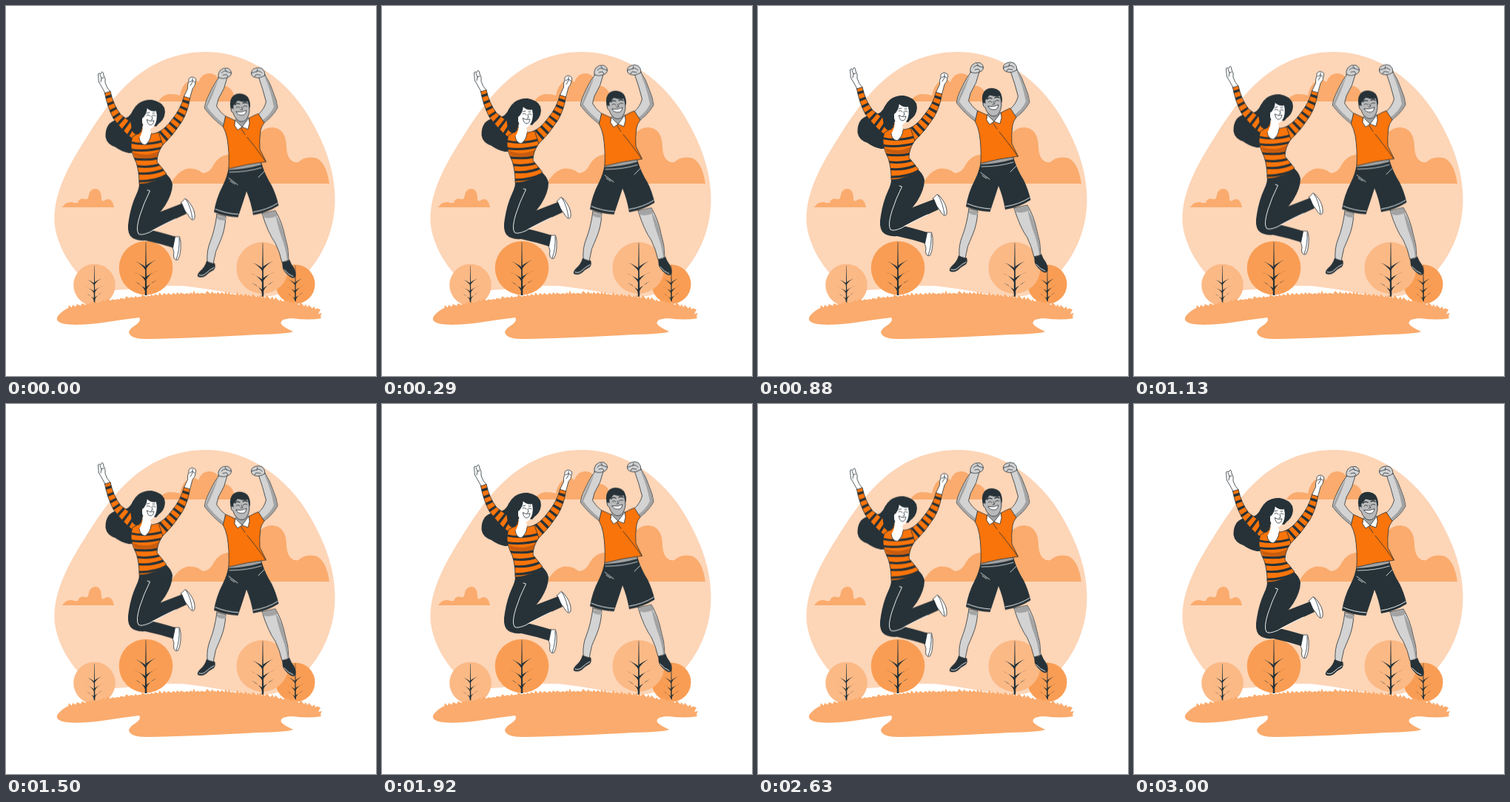
Animation, 500 px wide and 500 px high, one loop 3.04 s. Source, as an HTML page:

```html
<!DOCTYPE html>
<html lang="en">
<head>
<meta charset="utf-8">
<title>Jumping friends</title>
<style>
html, body { margin: 0; width: 100%; height: 100%; overflow: hidden; background: #fff; }
svg { display: block; width: 100vw; height: 100vh; }
.float { animation: float 3040ms linear -40ms infinite; }
.fast { animation-duration: 1520ms; }
@keyframes float { 50% { transform: translateY(-10px); } }
.dark { fill: #263238; }
.orange { fill: #f9740b; }
.pale { fill: #faab6d; }
.line { fill: none; stroke: #263238; stroke-width: .8; stroke-linecap: round; stroke-linejoin: round; }
.ink { stroke: #263238; stroke-width: .8; stroke-linejoin: round; stroke-linecap: round; }
.white { fill: #fff; }
.skin { fill: #d3d3d3; }
.shade { fill: #a3a3a3; }
.seam { fill: none; stroke: #fff; stroke-width: .9; stroke-linecap: round; }
.stripe { fill: none; stroke: #263238; stroke-width: 3.1; }
.bands { fill: none; stroke: #263238; stroke-width: 30; stroke-dasharray: 3.4 5.9; }
</style>
</head>
<body>
<svg viewBox="0 0 500 500">
<defs>
  <path id="twigs" d="M0-4Q-4-14-15-19Q-6-13 0-9ZM0-18Q-5-28-17-32Q-6-27 0-23ZM0-33Q-4-41-14-46Q-5-42 0-38Z"/>
  <g id="tree" class="dark">
    <path d="M-1.300 0L-.3-72H.3L1.300 0Z"/>
    <use href="#twigs"/>
    <use href="#twigs" transform="translate(0 -2) scale(-1 1)"/>
  </g>
  <path id="sleeveL" d="M133.500 118L141 115.500Q145 134 155 147Q169 159 185 165L183 181L170 179Q157 169 145 152Q137 137 133.500 118Z"/>
  <path id="sleeveR" d="M240.500 122.500L248.500 125Q246 142 238 156Q226 175 212 188L202 187L203 172Q215 167 224 154Q236 140 240.500 122.500Z"/>
  <path id="top" d="M171 177Q179 172 184 169L198 173L206 171L212 188Q204 199 204 211Q211 219 217 227Q202 240 180 241Q180 224 176 212Q168 196 169 185Z"/>
  <clipPath id="clipL"><use href="#sleeveL"/></clipPath>
  <clipPath id="clipR"><use href="#sleeveR"/></clipPath>
  <clipPath id="clipTop"><use href="#top"/></clipPath>
</defs>

<path fill="#fdd5b7" d="M271 62C330 62 381 102 409 149C435 193 445 229 444.500 264C444 307 424 347 396 371C382 384 367 393 346 393C308 391 280 382 236 378C203 377 160 385 135 384C108 382 75 342 67 303C59 262 83 218 108 179C137 134 180 62 271 62Z"/>
<g class="pale">
  <path d="M206 129Q211 120 221 119Q230 119 235 121Q238 105 248 101Q256 98 260 103Q264 91 275 91Q288 92 290 108Q297 107 302 111Q308 115 308 124L314 129Z"/>
  <path d="M223 240Q231 224 244 220Q256 218 266 226Q275 226 281 214Q287 203 299 201Q317 199 329 214Q334 164 360 164Q378 165 379 190C379 204 386 213 395 211Q404 203 417 205Q432 208 437 240Z"/>
  <path d="M76 272Q81 264 89 265Q94 267 97 266Q99 259 108 261Q111 262 112 255Q114 247 121 247Q129 247 129 262Q131 265 134 262Q143 258 146 272Z"/>
</g>

<circle cx="119.500" cy="377" r="28.300" fill="#fbb986"/>
<circle cx="189" cy="354" r="36.300" fill="#f99d54"/>
<circle cx="391" cy="376" r="26.500" fill="#f99d54"/>
<circle cx="346.500" cy="354" r="35" fill="#fbb986"/>
<use href="#tree" transform="translate(119.500 402) scale(.71)"/>
<use href="#tree" transform="translate(189 391)"/>
<use href="#tree" transform="translate(347 393) scale(1.010)"/>
<use href="#tree" transform="translate(391 402) scale(.72)"/>
<path id="ground" class="pale"/>

<g class="float">
  <!-- hair behind -->
  <path class="dark" d="M178 134Q186 126 197 127Q209 129 214 138Q216 148 210 155L203 163L186 160Q176 178 180 190Q175 200 166 199Q154 196 148 191Q136 187 134.500 177Q134 167 139 160Q144 155 150 154Q164 153 168 147Q172 141 178 134Z"/>
  <!-- far leg -->
  <path class="white ink" d="M236.500 266L242 260.500Q246 262 250 269Q256 278 255 287Q254 290 251 289Q247 285 245 281Q238 274 236.500 266Z"/>
  <path class="line" d="M243 261Q250 272 252 288"/>
  <path class="dark" d="M190 286L212 277L238 267L244 281Q224 290 196 304L184 308Z"/>
  <!-- near leg -->
  <path class="white ink" d="M227 312L234.500 312Q237 319 236 329Q235 339 232.500 343Q229 345 227 341Q226 337 227 333Q226 328 224.500 326Z"/>
  <path class="line" d="M234 314Q235 329 230 343"/>
  <path class="dark" d="M180 240Q201 240 215 226Q223 232 225 241Q225 254 215 270L191 302Q206 305 229 312L226 327Q207 321 188 317Q174 318 168 311Q163 304 166 289Q169 270 176 255Q180 247 180 240Z"/>
  <path class="seam" d="M191 249L194.500 250Q186 267 181 283Q175 302 179 308Q182 311 194 306Q215 294 229 288"/>

  <!-- arms -->
  <path class="white ink" d="M134 118L128.500 108Q124 103 125 98L124.500 92Q126 90 128 92L130 89Q132 90 132 94Q135 98 134 104Q136 111 141 116Z"/>
  <path class="line" d="M127 93L129 98L132 97M129 98L128 103"/>
  <path class="white ink" d="M240.500 122.500L245.500 112Q245 106 247 102Q246 98 249 97Q252 95 254 97Q258 98 256 103Q256 108 252 112L248.500 125Z"/>
  <path class="line" d="M248 103L252 101L255 103M252 98V103L249 108"/>
  <use class="orange" href="#sleeveL"/>
  <path class="bands" clip-path="url(#clipL)" d="M138 121Q143 139 151 150Q164 164 188 176"/>
  <use class="line" href="#sleeveL"/>
  <use class="orange" href="#sleeveR"/>
  <path class="bands" clip-path="url(#clipR)" d="M244 128Q239 145 229 157Q218 171 202 183"/>
  <use class="line" href="#sleeveR"/>

  <!-- torso -->
  <use class="orange" href="#top"/>
  <g clip-path="url(#clipTop)">
    <path fill="#b85510" opacity=".75" d="M172 198Q190 205 207 196L204 206Q187 207 174 204Z"/>
    <path class="stripe" d="M166 184Q187 190 214 182M166 194Q188 198 214 191M168 206Q190 210 210 205M172 216Q193 220 212 213M174 226Q198 229 216 220M176 237Q201 238 220 227"/>
  </g>
  <use class="line" href="#top"/>
  <path class="white" d="M185 162L195 166L196 173Q195 184 188 188Q181 187 180 178Q184 174 185 162Z"/>
  <path class="line" d="M180 178Q181 187 188 188Q195 183 196 174"/>

  <!-- head -->
  <path class="white" d="M184 150Q187 145 190 138Q197 144 203 142Q205 152 202 159Q198 167 192 167Q186 164 184 158Z"/>
  <path class="dark" d="M168 154Q169 140 179 132Q187 126 199 128Q210 130 214 138Q217 150 208 158L203 160Q206 149 203 142Q196 141 191 137Q190 148 184 152Q181 156 184 160Q185 168 180 173Q174 176 170 168Z"/>
  <path class="line" d="M190 148Q193 146 195 149M198 148Q200 147 202 149M197 149L198 153L196 154M190 145L194 144M198 145L201 145"/>
  <path class="white ink" d="M190.500 154Q195 157 200 155Q199 161 195 161Q191 160 190.500 154Z"/>
</g>

<g class="float fast">
  <!-- legs -->
  <path class="skin ink" d="M285 282L297 285Q296 303 290 317Q282 332 280 349L272 346Q271 331 276 319Q282 304 285 282Z"/>
  <path class="shade" d="M285 284L297 286V290Q289 291 285 287Z"/>
  <path class="skin ink" d="M346 281L364 277Q373 292 377 312Q382 327 382 344L373 347Q370 333 364 321Q354 307 346 281Z"/>
  <path class="shade" d="M346 282L364 278L367 284Q356 289 348 286ZM364 282Q372 294 376 310Q381 328 381.500 343L380 344Q378 328 373 315Q368 302 364 282Z"/>
  <path class="dark" d="M271 345Q276 349 282 348Q284 353 281 357Q275 360 270 365Q264 369 259 366Q258 363 262 359Q269 353 271 345Z"/>
  <path class="dark" d="M373 346Q379 347 383 343Q385 349 389 354Q393 362 391 367Q387 370 382 365Q376 360 374 355Z"/>
  <path class="seam" d="M261 364Q266 366 271 361Q275 357 281 354M376 357Q382 364 388 366"/>

  <!-- shorts -->
  <path class="dark" d="M301 218L345 212Q350 229 359 243Q365 255 368.500 270Q353 280 334 283Q331 265 325 251Q321 264 313.500 286Q295 285 281 279Q284 260 293 243Q299 231 301 218Z"/>
  <path class="shade" d="M301 219L344 212L345 215Q324 221 301 222Z"/>
  <path class="seam" d="M283 275Q297 281 314 282M334 279Q353 276 367 267"/>
  <path class="seam" d="M302 225Q325 225 345 219M301 233L313 242M303 237L309 241M349 224L341 232" stroke-opacity=".85"/>

  <!-- arms -->
  <path class="skin ink" d="M288 97L299 97Q296 112 287 126L284.500 136Q289 144 297 150L294 164Q280 154 268.500 139Q268 133 275 119Q282 104 288 97Z"/>
  <path class="shade" d="M287 100Q276 118 269 138Q278 151 294 163L294.500 160Q280 149 272 137Q280 120 287 100Z"/>
  <path class="skin ink" d="M341.500 97L350 94Q357 104 361 117Q366 128 367 138Q359 152 346 160L341 147Q349 140 351.500 130Q347 112 341.500 97Z"/>
  <path class="shade" d="M349 95Q357 105 360 117Q366 130 366.500 138Q358 152 346 159L345 156Q357 148 362 137Q358 115 349 95Z"/>
  <path class="skin ink" d="M287 97Q286 92 289 88Q293 83.500 299 84.500Q304 86 304.500 91Q304 96 299 97Q294 100 287 97Z"/>
  <path class="line" d="M291 91Q295 87 298 89L304 91M293 94L298 93L300 96M296 86L298 89"/>
  <path class="skin ink" d="M350 94Q350 88 346 85Q341 82.500 336 85Q331 87 331.500 92Q332 96 337 97Q343 99 350 94Z"/>
  <path class="line" d="M346 91Q342 87 339 89L332 91M344 94L338 93L336 96M340 86L339 89"/>

  <!-- shirt -->
  <path class="orange ink" d="M297 149.500Q305 153 311 156L327 153Q335 148 341 146L349 158.500Q345 163 344 169Q342 182 343 194L351.500 211Q326 214 301 220.500Q302 198 299 180Q297 170 293.500 164Z"/>
  <path class="line" d="M317 165L323 174M326 178Q337 191 351 211"/>
  <path class="shade" d="M310 148L327 147L328 154L319 165L310 156Z"/>
  <path class="white ink" d="M310 155L319 164L313 168L309 162ZM328 152L319 164L327 167L329 159Z"/>

  <!-- head -->
  <path class="dark" d="M303.500 139Q301 126 308 121Q315 117 323 120.500Q330 124 330 136L328 142H306Z"/>
  <path fill="#b9b9b9" class="ink" d="M307 135Q310 132 313 128Q321 131 327 129Q329 136 329 142Q328 151 323 155.500Q317 158.500 312 154Q308 150 307 145Q304 144 304 140Q305 137 307 139Z"/>
  <path class="line" style="stroke-width:1.300" d="M309.500 134Q312 131 316 133M320 132Q324 130 326 132"/>
  <path class="line" d="M311 138Q313 135 316 138M320 137Q323 134 326 136M318 137L320 140L317 141"/>
  <path class="white ink" d="M311 143.500Q318 145 325 141.500Q324 148 319 148Q313 148 311 143.500Z"/>
</g>
</svg>
<script>
// Ragged grass along an arched hilltop
let seed = 7;
const rand = () => (seed = seed * 16807 % 2147483647) / 2147483647;
const hill = x => 389 + (x < 270 ? 20 * ((270 - x) / 188) ** 2 : 23 * ((x - 270) / 155) ** 2);
let d = "M82 409";
for (let x = 84; x < 421; x += 3.5 + rand() * 4) {
  d += `L${x} ${hill(x)}l${1 + rand() * 2} ${-1 - rand() * 3.5}`;
}
d += "L425 410L422 416L427 415Q424 419 426 422Q411 425 386 422Q369 423 372 430Q375 434 388 440" +
  "Q382 443 340 444Q250 449 190 450Q168 450 166 441Q167 436 174 432Q184 425 180 421" +
  "Q155 424 130 428Q99 432 82 430Q67 428 69 421Q72 415 82 409Z";
document.getElementById("ground").setAttribute("d", d);
</script>
</body>
</html>
```
